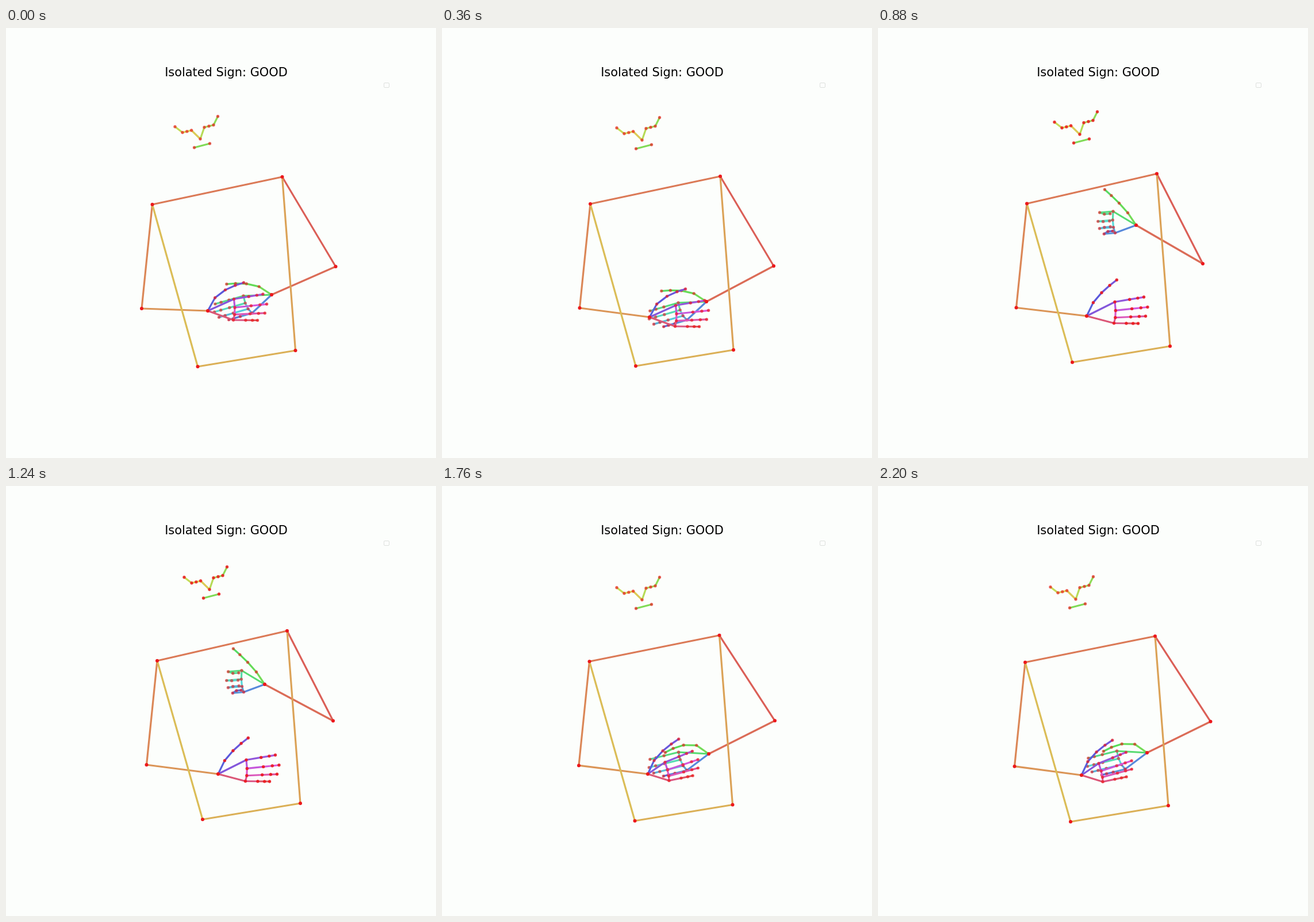
An HTML page with a canvas that plays this animation: 748x748 px, repeating every 2.24 s.

```html
<!DOCTYPE html>
<html lang="en">
<head>
<meta charset="utf-8">
<title>Isolated Sign</title>
<style>
  html, body { margin: 0; width: 100%; height: 100%; overflow: hidden; background: #fcfefc; }
  canvas, svg { position: absolute; left: 0; top: 0; width: 748px; height: 748px; }
  text { font: 20.88px "DejaVu Sans", sans-serif; text-anchor: middle; }
</style>
</head>
<body>
<canvas id="stage" width="748" height="748"></canvas>
<svg viewBox="0 0 748 748">
  <text x="383" y="83.6">Isolated Sign: GOOD</text>
  <rect x="657.5" y="95.5" width="9" height="8" rx="1.5" fill="none" stroke="#dde0dd"/>
</svg>
<script>
const ctx = document.getElementById('stage').getContext('2d');
const LOOP = 2240, STEP = 40;

// slope, hip: shoulder tilt and torso height; elbow: offset from the right shoulder.
// palm: first and last knuckle from the wrist; thumb: first and last angle; tilt: finger angle.
const ready = {
  lift: 0, slope: 24, hip: 306, elbow: [93, 156],
  right: { palm: [-49, 2, -34, 32], thumb: [-33, 4], tilt: 16 },
  left: { palm: [45.5, -20.5, 44.5, 16], thumb: [-61, -18], tilt: -9.5 }
};
const raised = {
  lift: 1, slope: 26, hip: 302, elbow: [80, 156.5],
  right: { palm: [-40, -24, -36.5, 13.5], thumb: [-56, -42], tilt: 5 },
  left: { palm: [49, -24.5, 47.5, 12.5], thumb: [-64, -38], tilt: -9.5 }
};
const landed = {
  lift: 0, slope: 21.5, hip: 299.5, elbow: [105, 147],
  right: { palm: [-55, -3, -37, 31], thumb: [-37, -6], tilt: 22 },
  left: { palm: [42, -22, 42, 13], thumb: [-55, -12], tilt: -12 }
};
const rest = {
  lift: 0, slope: 22.7, hip: 300, elbow: [96.5, 148.5],
  right: { palm: [-52.5, -3, -38, 28.5], thumb: [-35, 27], tilt: 14 },
  left: { palm: [30, -20.5, 37, 11.5], thumb: [-65, -34], tilt: -22 }
};

const key = (at, stance, nose, chest, leftWrist, rightWrist) =>
  ({ at, ...stance, nose, chest, leftWrist, rightWrist });
const keys = [
  key(0, ready, [338, 193], [367.5, 283], [351, 492], [462, 464]),
  key(360, ready, [348, 195], [371, 282], [361, 503], [460, 476]),
  key(880, raised, [351, 185], [372, 279.5], [363, 501], [449, 343]),
  key(1240, raised, [354, 180], [376, 278], [369, 501], [450, 345]),
  key(1440, landed, [344, 196], [365, 285.5], [352, 506], [462, 462]),
  key(1760, rest, [348, 198], [369.5, 282.5], [358, 501], [464, 466]),
  key(2200, rest, [344, 197], [369, 284], [354, 503], [468, 464])
];

const bodyLinks = [[1,3], [3,7], [0,1], [0,2], [2,6], [1,5], [4,5], [0,4]];
const faceLinks = [[0,1], [1,2], [2,3], [3,4], [0,5], [5,6], [6,7], [7,8], [9,10]];
const chain = (...ids) => ids.slice(1).map((id, i) => [ids[i], id]);
const handLinks = [
  ...chain(0, 1, 2, 3, 4), ...chain(0, 5, 6, 7, 8), ...chain(5, 9, 10, 11, 12),
  ...chain(9, 13, 14, 15, 16), [13,17], [17,18], [0,17], ...chain(18, 19, 20)
];
const LINKS = bodyLinks.length + faceLinks.length + 2 * handLinks.length;

const mix = (a, b, u) => a + (b - a) * u;
const add = ([x, y], dx, dy) => [x + dx, y + dy];
const polar = (p, r, deg, side) =>
  add(p, side * r * Math.cos(deg * Math.PI / 180), r * Math.sin(deg * Math.PI / 180));

// Mixes numbers, lists and nested objects alike.
function blend(a, b, u) {
  if (typeof a === 'number') return mix(a, b, u);
  if (Array.isArray(a)) return a.map((v, i) => blend(v, b[i], u));
  return Object.fromEntries(Object.keys(a).map(k => [k, blend(a[k], b[k], u)]));
}

function faceOf(nose) {
  const at = (x, y) => add(nose, x, y);
  const eye = (x, y) => [0, 1, 2].map(i => at(x + 8 * i, y - 2 * i));
  const leftEye = [0, 1, 2].map(i => at(-15.4 - 7.8 * i, -15 + 1.9 * i));
  return [nose, ...leftEye, at(-44, -21.3), ...eye(7, -20.3), at(30.5, -39.3), at(-10.5, 15), at(16.5, 8)];
}

function bodyOf(p) {
  const [x, y] = p.chest;
  const sag = 32 * p.lift * (1 - p.lift); // hips dip while the arm travels
  const left = [x - 113, y + p.slope], right = [x + 113, y - p.slope];
  const hip = [x - 34, y + p.hip + sag];
  return [left, right, add(left, -18.5, 181), add(right, ...p.elbow),
    hip, add(hip, 170, -28), p.leftWrist, p.rightWrist];
}

// side: 1 points right, -1 points left. Curled fingers fold back to the knuckle.
function handOf(wrist, { palm, thumb, tilt }, side, fan, curl) {
  const joints = [wrist];
  [0, .55, .85, 1].forEach((u, j) =>
    joints.push(polar(joints[j], 26 - 3.5 * j, mix(...thumb, u), side)));
  const stops = [mix(.51, .46, curl), mix(.79, .3, curl), mix(1, .1, curl)];
  for (let f = 0; f < 4; f++) {
    const bow = f * (3 - f) / 2;
    const knuckle = add(wrist,
      mix(palm[0], palm[2], f / 3) + side * 1.8 * bow,
      mix(palm[1], palm[3], f / 3) + 2.6 * bow);
    const reach = 56 * Math.cos((f - 1.1) * .38);
    joints.push(knuckle);
    stops.forEach((s, i) => {
      const joint = polar(knuckle, reach * s, tilt + fan * f, side);
      joints.push(i ? add(joint, 0, curl * (3.5 - 2.4 * f)) : joint);
    });
  }
  return joints;
}

function drawLinks(pts, links, first) {
  links.forEach(([a, b], i) => {
    ctx.strokeStyle = `hsl(${3.6 + (first + i) * 360 / LINKS}, 65%, 60%)`;
    ctx.beginPath();
    ctx.moveTo(...pts[a]);
    ctx.lineTo(...pts[b]);
    ctx.stroke();
  });
}

function drawDots(pts, alpha, r) {
  ctx.fillStyle = `rgba(236, 24, 28, ${alpha})`;
  for (const [x, y] of pts) {
    ctx.beginPath();
    ctx.arc(x, y, r, 0, 7);
    ctx.fill();
  }
}

function poseAt(t) {
  let k = 0;
  while (k < keys.length - 2 && t >= keys[k + 1].at) k++;
  const a = keys[k], b = keys[k + 1];
  let u = (t - a.at) / (b.at - a.at);
  if (a.lift !== b.lift) u = u * u * (3 - 2 * u);
  return blend(a, b, u);
}

function draw(t) {
  const p = poseAt(t);
  const body = bodyOf(p);
  const right = handOf(p.rightWrist, p.right, -1, 0, p.lift);
  const left = handOf(p.leftWrist, p.left, 1, 3.4, 0);

  ctx.fillStyle = '#fcfefc';
  ctx.fillRect(0, 0, 748, 748);
  ctx.lineWidth = 3.2;
  ctx.lineCap = 'round';
  let first = 0;
  for (const [pts, links, alpha] of [
    [body, bodyLinks, 0], [faceOf(p.nose), faceLinks, .67 + .18 * p.lift],
    [right, handLinks, .62], [left, handLinks, .68 + .2 * p.lift]
  ]) {
    drawLinks(pts, links, first);
    drawDots(pts, alpha, 2.7);
    first += links.length;
  }
  drawDots(body, 1, 3);
}

// One step in every thirteen repeats the picture before it.
function tick() {
  let step = Math.floor((performance.now() - start) % LOOP / STEP);
  if (step % 13 === 11 && step > 0) step--;
  draw(step * STEP);
  requestAnimationFrame(tick);
}
const start = performance.now();
tick();
</script>
</body>
</html>
```
